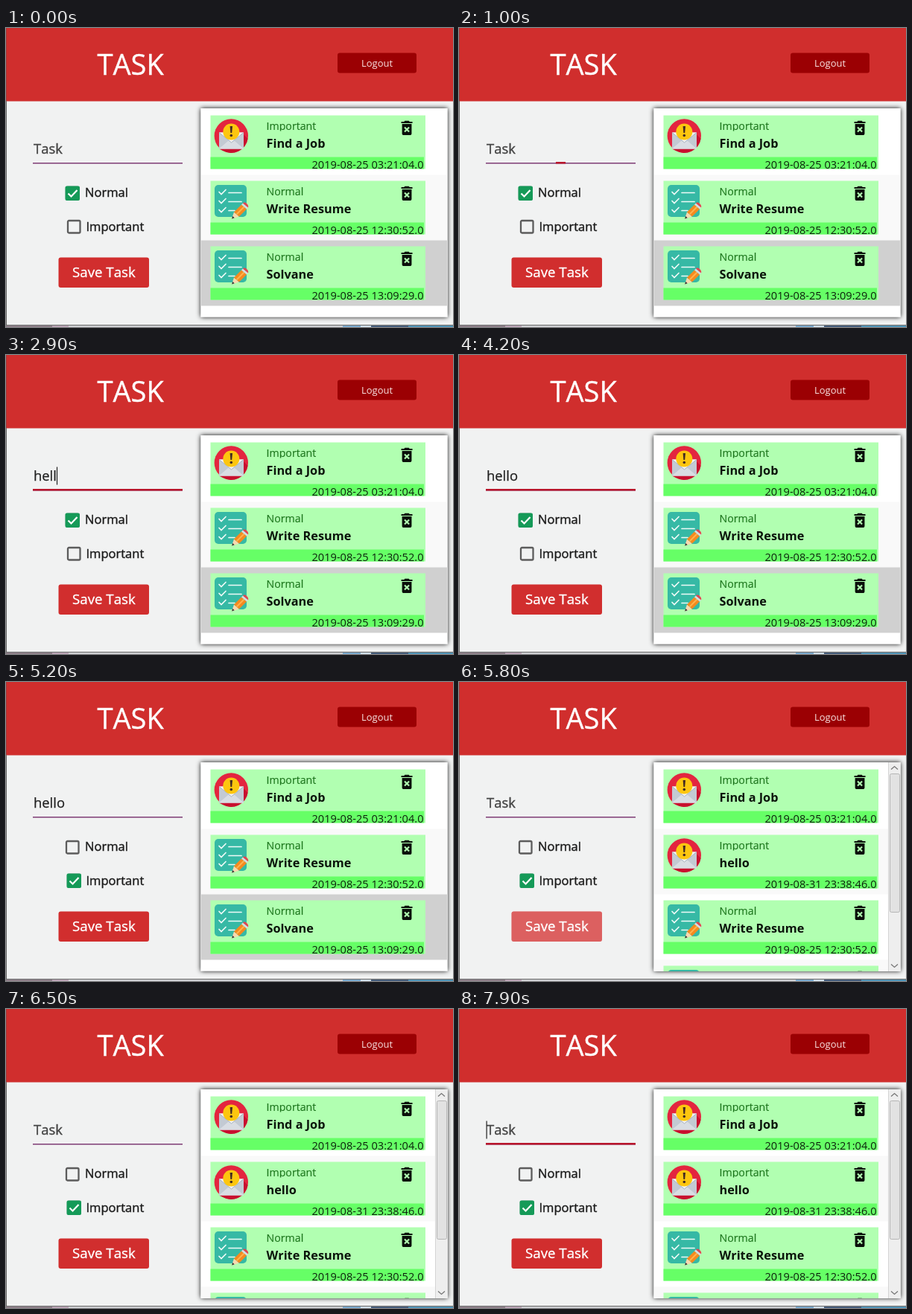
An HTML page that plays this animation: 600 by 402 pixels, repeating every 8000 ms.

```html
<!DOCTYPE html>
<html lang="en">
<head>
<meta charset="utf-8">
<title>Task list</title>
<style>
  html, body { margin: 0; width: 100%; height: 100%; overflow: hidden; background: #f1f2f2; }
  svg { display: block; width: 600px; height: 402px; font-family: "Open Sans", "Noto Sans", sans-serif; font-kerning: none; }
  .title { font-size: 38px; fill: #fff; stroke: #fff; stroke-width: .4; }
  .logout { font-size: 13px; fill: #f8e2e2; }
  .field { font-size: 18.4px; fill: #222; stroke: #222; stroke-width: .25; }
  .hint { fill: #444; stroke: #444; stroke-width: .4; }
  .option { font-size: 16.5px; fill: #1c1c1c; stroke: #1c1c1c; stroke-width: .4; }
  .save { font-size: 18.7px; fill: #fff; stroke: #fff; stroke-width: .35; }
  .kind { font-size: 14.2px; fill: #1d751d; stroke: #1d751d; stroke-width: .15; }
  .name { font-size: 16.3px; font-weight: 700; fill: #0b140b; }
  .date { font-size: 14.6px; fill: #0c200c; text-anchor: end; }
</style>
</head>
<body>
<svg viewBox="0 0 600 402" xmlns="http://www.w3.org/2000/svg">
  <defs>
    <filter id="shadow" x="-10%" y="-10%" width="120%" height="120%">
      <feDropShadow dx="0" dy="0" stdDeviation="3.2" flood-color="#000" flood-opacity="1"/>
    </filter>
    <clipPath id="panel"><rect x="262" y="108" width="331" height="281"/></clipPath>
    <clipPath id="kindClip"><rect x="340" y="0" width="150" height="21"/></clipPath>

    <g id="mail">
      <circle cx="302.300" cy="27.500" r="22.700" fill="#e3253f"/>
      <path d="M286 45l5 2.500a22.700 22.700 0 0 0 33.500-16l-6.500-7z" fill="#c8102f"/>
      <path d="M286 23h33v22h-33z" fill="#e4e6ea"/>
      <path d="M286 23l13 11-13 11zM319 23l-13 11 13 11z" fill="#c3cad3"/>
      <path d="M286 45l13.500-11.500h6L319 45z" fill="#d9dde3"/>
      <path d="M286 23h33l-16.500 13.500z" fill="#f4f4f5"/>
      <path d="M286 23l16.500 13.500L319 23" fill="none" stroke="#a4afbd"/>
      <circle cx="302.300" cy="22" r="11" fill="#fdc60f"/>
      <path d="M300.600 14.500h3.400l-.8 9h-1.800z" fill="#432a22"/>
      <circle cx="302.300" cy="27" r="1.800" fill="#432a22"/>
    </g>

    <g id="list">
      <rect x="280" y="5.500" width="43" height="43" rx="5" fill="#36b9a5"/>
      <path d="M286 15l3 3 6-6M286 27l3 3 6-6M286 39l3 3 6-6M299 16h17M299 28h17M299 40h8"
        fill="none" stroke="#eefaf7" stroke-width="1.700" stroke-linecap="round"/>
      <path d="M303 51l3-9 7 6z" fill="#f7d9b0"/>
      <path d="M303 51l1.200-3.500 2.500 2.200z" fill="#333"/>
      <path d="M306 42l10-10 7 6-10 10z" fill="#f58a1f"/>
      <path d="M309.500 45l10-10" stroke="#ffb34d" stroke-width="2"/>
      <path d="M316 32l2-2 7 6-2 2z" fill="#d8dce0"/>
      <path d="M318 30q2-2 5 .5t2 5.500z" fill="#e5444f"/>
    </g>

    <path id="bin" transform="translate(525.2 4.100) scale(1.070)" fill="#0a0f0a"
      d="M6 19c0 1.100.9 2 2 2h8c1.100 0 2-.9 2-2V7H6v12zm2.460-7.120l1.410-1.410L12 12.590l2.120-2.120 1.410 1.410L13.410 14l2.120 2.120-1.410 1.410L12 15.410l-2.120 2.120-1.410-1.410L10.590 14l-2.130-2.120zM15.500 4l-1-1h-5l-1 1H5v2h14V4z"/>
  </defs>

  <rect width="600" height="402" fill="#f1f2f2"/>
  <rect width="600" height="98.500" fill="#d02e2d"/>
  <text class="title" x="122.500" y="63">TASK</text>
  <rect x="445" y="33.500" width="106" height="27" rx="3" fill="#9b0003"/>
  <text class="logout" x="477" y="52">Logout</text>

  <text id="field" class="field" x="37" y="169"></text>
  <rect x="36" y="181" width="201" height="1.500" fill="#7f3d76"/>
  <rect id="focus" y="180" height="2.500" fill="#b8152b"/>
  <rect id="caret" y="150.500" width="1.200" height="24" fill="#222"/>

  <g id="normal" transform="translate(79.500 212.500)"></g>
  <text class="option" x="106" y="227">Normal</text>
  <g id="important" transform="translate(81.500 257.500)"></g>
  <text class="option" x="107.500" y="272.500">Important</text>

  <rect x="70.500" y="308.500" width="121.500" height="40.500" rx="3" fill="#d12e2e"/>
  <rect id="flash" x="70.500" y="308.500" width="121.500" height="40.500" rx="3" fill="#fff"/>
  <text class="save" x="89" y="335">Save Task</text>

  <rect x="261.500" y="108" width="331" height="280.500" fill="#fff" filter="url(#shadow)"/>
  <g clip-path="url(#panel)">
    <g id="before"></g>
    <g id="after"></g>
  </g>

  <rect y="98" width="1" height="304" fill="#666"/>
  <rect width="1" height="98" fill="#a13a3a"/>
  <rect y="399" width="600" height="1.200" fill="#666"/>
  <g id="edge"></g>
</svg>
<script>
const LOOP = 8000, TICK = 100, PITCH = 88;
const $ = id => document.getElementById(id);

const job = ["Important", "Find a Job", "2019-08-25 03:21:04.0"];
const resume = ["Normal", "Write Resume", "2019-08-25 12:30:52.0"];
const drill = ["Normal", "Solvane", "2019-08-25 13:09:29.0"];
const hello = ["Important", "hello", "2019-08-31 23:38:46.0"];

function card([kind, name, date], i, selected) {
  const urgent = kind === "Important";
  const back = i === selected ? "#d0d0d0" : i % 2 ? "#f9f9f9" : "#fff";
  return `<g transform="translate(0 ${117.5 + i * PITCH})">
    <rect x="262" y="-8" width="330" height="88" fill="${back}"/>
    <rect x="274.500" width="288.500" height="72" fill="#b1ffb1"/>
    <rect x="274.500" y="56" width="286.500" height="16" fill="#66ff66"/>
    <use href="#${urgent ? "mail" : "list"}"/>
    <g ${urgent ? 'clip-path="url(#kindClip)"' : ""}><text class="kind" x="349.500" y="19.500">${kind}</text></g>
    <text class="name" x="349.500" y="43.500">${name}</text>
    <text class="date" x="560.500" y="71.300">${date}</text>
    <use href="#bin"/>
  </g>`;
}

const scrollbar = `<rect x="576.500" y="108" width="16" height="281" fill="#eee"/>
  <path d="M576.500 108v281" stroke="#d4d4d4"/>
  <rect x="578.500" y="123.500" width="13" height="186" rx="2" fill="#e2e2e2" stroke="#b5b5b5"/>
  <path d="M580 117.500l4.500-4 4.500 4M580 379.500l4.500 4 4.500-4" fill="none" stroke="#777" stroke-width="1.300"/>`;

$("before").innerHTML = [job, resume, drill].map((c, i) => card(c, i, 2)).join("");
$("after").innerHTML = [job, hello, resume, drill].map((c, i) => card(c, i)).join("") + scrollbar;

// Sliver of desktop below the window: x, width, colour
$("edge").innerHTML = [
  [0, 600, "#d0d1d5"], [0, 62, "#85747f"], [62, 22, "#b99fb3"], [452, 24, "#6fa5cf"],
  [476, 14, "#d3e4ef"], [490, 50, "#344e70"], [540, 60, "#3f8db5"]
].map(([x, w, c]) => `<rect x="${x}" y="400.300" width="${w}" height="1.700" fill="${c}"/>`).join("");

for (const id of ["normal", "important"]) {
  $(id).innerHTML = `<rect x="1.500" y="1.500" width="16.500" height="16.500" rx="1.500" fill="none" stroke="#5c5c5c" stroke-width="2.300"/>
    <g><rect width="19.500" height="19.500" rx="2" fill="#159a58"/>
    <path d="M4 10l4 4 8-8.500" fill="none" stroke="#fff" stroke-width="2.200"/></g>`;
}

// Each track lists [start, value]; a value holds until the next start
const tracks = {
  text: [[0, ""], [2300, "h"], [2400, "he"], [2500, "hel"], [2900, "hell"], [3200, "hello"], [5700, ""]],
  focus: [[0, 0], [1000, .065], [1100, 1], [4900, 0], [7300, .065], [7400, 1]],
  caret: [[0, 0], [1100, 1], [1300, 0], [1600, 1], [1900, 0], [2200, 1], [3600, 0], [3900, 1],
    [4200, 0], [4600, 1], [4900, 0], [7400, 1], [7600, 0], [7900, 1]],
  urgent: [[0, 0], [4900, .5], [5000, 1]],
  saved: [[0, false], [5700, true]]
};
const at = (name, t) => tracks[name].filter(s => s[0] <= t).pop()[1];

function flash(t) {
  if (t < 5600 || t >= 6500) return 0;
  return t < 5800 ? .14 + (t - 5600) / 2000 : .24 * (6500 - t) / 700;
}

function mark(id, amount) {
  const tick = $(id).lastElementChild;
  tick.setAttribute("opacity", amount);
  tick.setAttribute("transform", `translate(9.75 9.75) scale(${amount}) translate(-9.75 -9.75)`);
}

function draw(t) {
  const text = at("text", t), field = $("field"), width = 201 * at("focus", t);
  field.textContent = text || "Task";
  field.setAttribute("class", text ? "field" : "field hint");
  $("focus").setAttribute("x", 136.5 - width / 2);
  $("focus").setAttribute("width", width);
  $("caret").setAttribute("x", text ? 37 + field.getComputedTextLength() : 36.5);
  $("caret").setAttribute("opacity", at("caret", t));
  const urgent = at("urgent", t), saved = at("saved", t);
  mark("normal", 1 - urgent);
  mark("important", urgent);
  $("flash").setAttribute("opacity", flash(t));
  $("before").setAttribute("display", saved ? "none" : "inline");
  $("after").setAttribute("display", saved ? "inline" : "none");
}

const start = performance.now();
let last = -1;
function loop() {
  const t = Math.floor(((performance.now() - start) % LOOP) / TICK) * TICK;
  if (t !== last) draw(last = t);
  requestAnimationFrame(loop);
}
loop();
</script>
</body>
</html>
```
